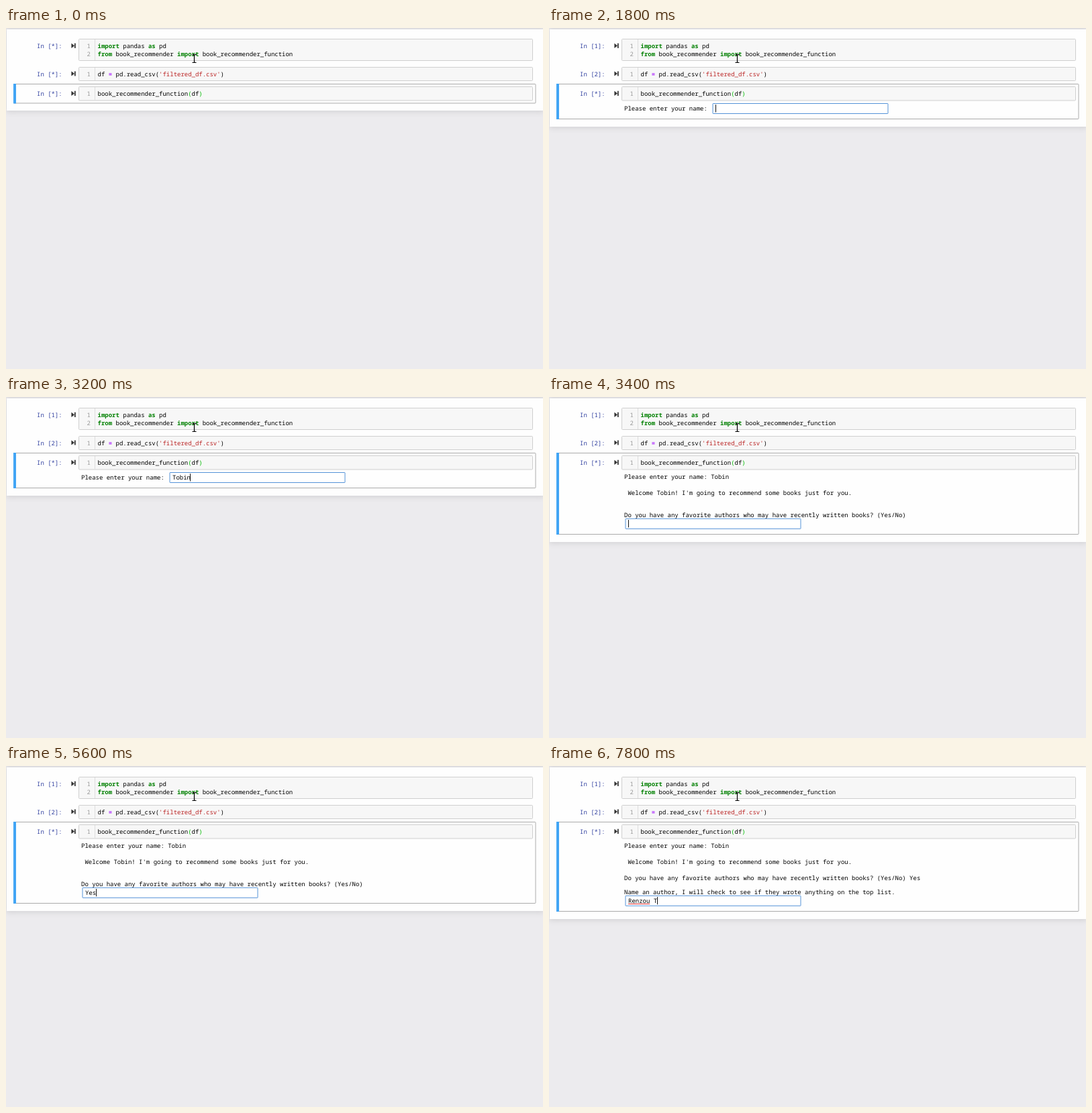
Write an HTML page that moves like this. It is 800 by 508 pixels and loops after 8 s.

```html
<!DOCTYPE html>
<html lang="en">
<head>
<meta charset="utf-8">
<title>Book recommender notebook</title>
<style>
  html, body { margin: 0; width: 100%; height: 100%; overflow: hidden; background: #ecebee; }
  #page { position: absolute; left: 1px; top: 2px; width: 800px; background: #fefefe;
          box-shadow: 0 0 8.5px 1px rgba(87, 87, 87, .2); }
  svg { position: absolute; left: 0; top: 0; display: block; }
  text { font: 8.98px "Noto Sans Mono", "DejaVu Sans Mono", monospace; fill: #000;
         white-space: pre; text-rendering: geometricPrecision; }
  .prompt { fill: #303f9f; }
  .num { fill: #999; }
  .kw { fill: #008000; font-weight: bold; }
  .op { fill: #aa22ff; font-weight: bold; }
  .str { fill: #ba2121; }
  .br { fill: #00bb00; }
  .area { fill: #f7f7f7; stroke: #cfcfcf; }
  .rule { fill: #ddd; }
  .icon { fill: #333; }
  #frame { fill: none; stroke: #ababab; }
  #bar { fill: #42a5f5; }
  #box rect { fill: #fff; stroke: #5593d8; }
</style>
</head>
<body>
<div id="page"></div>
<svg width="800" height="508" viewBox="0 0 800 508">
  <rect id="frame" x="11.5" y="83.5" width="777.5" rx="1"/>
  <rect id="bar" x="11" y="83" width="4"/>
  <g id="cells"></g>
  <g id="out"></g>
  <g id="box">
    <rect width="261" height="15" rx=".5"/>
    <text id="typed"></text>
    <path id="spell" stroke="#e03030" fill="none"/>
    <path id="caret" stroke="#111" fill="none"/>
  </g>
  <path d="M277.5 39.7h2.2l.8.7.8-.7h2.2M280.5 40.4v10.4M277.5 51.5h2.2l.8-.7.8.7h2.2" fill="none" stroke="#000" stroke-width="1.2"/>
</svg>
<script>
const $ = id => document.getElementById(id);
const CHAR = 5.388, LOOP = 8000;
const USER = 'Tobin', AUTHOR = 'Renzou T';
const ASK = 'Do you have any favorite authors who may have recently written books? (Yes/No)';
const span = (cls, s) => `<tspan class="${cls}">${s}</tspan>`;
const text = (x, y, s, cls = '') => `<text x="${x}" y="${y}" class="${cls}">${s}</text>`;

// Code cells: top, height, first baseline, lines
const cells = [
  [16.5, 32, 30, [
    `${span('kw', 'import')} pandas ${span('kw', 'as')} pd`,
    `${span('kw', 'from')} book_recommender ${span('kw', 'import')} book_recommender_function`]],
  [58.5, 20, 71.6, [`df ${span('op', '=')} pd.read_csv(${span('str', "'filtered_df.csv'")})`]],
  [87.5, 20.5, 101, [`book_recommender_function${span('br', '(')}df${span('br', ')')}`]]
];

$('cells').innerHTML = cells.map(([top, h, base, lines]) => `
  <rect class="area" x="108.5" y="${top}" width="676" height="${h}" rx="1"/>
  <rect class="rule" x="132" y="${top + .5}" width="1" height="${h - 1}"/>
  <path class="icon" d="M97.4 ${base - 7.2}l4.6 3.6l-4.6 3.6zM102 ${base - 7.2}h1.7v7.2h-1.7z"/>
  ${text(46, base, 'In [*]:', 'prompt')}
  ${lines.map((s, i) => text(120.6, base + 12 * i, i + 1, 'num') + text(136.6, base + 12 * i, s)).join('')}`).join('');
const prompts = document.querySelectorAll('.prompt');

const intro = [[122, `Please enter your name: ${USER}`],
  [145.6, ` Welcome ${USER}! I'm going to recommend some books just for you.`]];

// Output stages: cell bottom, input position, answer, printed lines
const stages = [
  { bottom: 112, lines: [] },
  { bottom: 135.5, box: [244, 112.5], answer: USER, lines: [[123, 'Please enter your name: ']] },
  { bottom: 204.5, box: [114, 181.3], answer: 'Yes', lines: [...intro, [178.6, ASK]] },
  { bottom: 216.5, box: [114, 193.3], answer: AUTHOR, lines: [...intro, [169.6, ASK + ' Yes'],
    [190.6, 'Name an author, I will check to see if they wrote anything on the top list.']] }
];

// Start time, stage, letters typed, caret shown
const steps = [
  [0, 0, 0, 0], [400, 0, 0, 0],
  [600, 1, 0, 1], [1200, 1, 0, 0], [1800, 1, 0, 1], [2200, 1, 0, 0],
  [2800, 1, 2, 1], [3000, 1, 4, 1], [3200, 1, 5, 1],
  [3400, 2, 0, 1], [3800, 2, 0, 0], [4400, 2, 0, 1], [4800, 2, 0, 0],
  [5200, 2, 1, 1], [5400, 2, 2, 1], [5600, 2, 3, 1],
  [5800, 3, 0, 1], [6600, 3, 0, 0],
  [6800, 3, 1, 1], [7000, 3, 2, 1], [7200, 3, 4, 1], [7400, 3, 5, 1], [7600, 3, 6, 1], [7800, 3, 8, 1]
];

function setAttrs(id, attrs) {
  for (const k in attrs) $(id).setAttribute(k, attrs[k]);
}

function show([start, stage, count, caret]) {
  const { bottom, box, answer, lines } = stages[stage];
  $('page').style.height = bottom + 9 + 'px';
  setAttrs('frame', { height: bottom - 83.5 });
  setAttrs('bar', { height: bottom - 82.5 });
  prompts[0].textContent = start < 400 ? 'In [*]:' : 'In [1]:';
  prompts[1].textContent = start < 400 ? 'In [*]:' : 'In [2]:';
  $('out').innerHTML = lines.map(([y, s]) => text(112, y, s)).join('');
  $('box').style.display = box ? '' : 'none';
  if (!box) return;
  const [x, y] = box, left = x + 4, word = answer.indexOf(' ');
  setAttrs('box', { transform: `translate(${x} ${y})` });
  setAttrs('typed', { x: 4, y: 10.4 });
  $('typed').textContent = answer.slice(0, count);
  const cx = Math.floor(left + count * CHAR) + .5 - x;
  setAttrs('caret', { d: caret ? `M${cx} 1.7v11.3` : '' });
  setAttrs('spell', { d: word > 0 && count > word ? `M4 12.2h${word * CHAR}` : '' });
}

let current;
function tick() {
  const t = performance.now() % LOOP;
  const step = steps.findLast(s => s[0] <= t);
  if (step !== current) show(current = step);
  requestAnimationFrame(tick);
}
tick();
</script>
</body>
</html>
```
